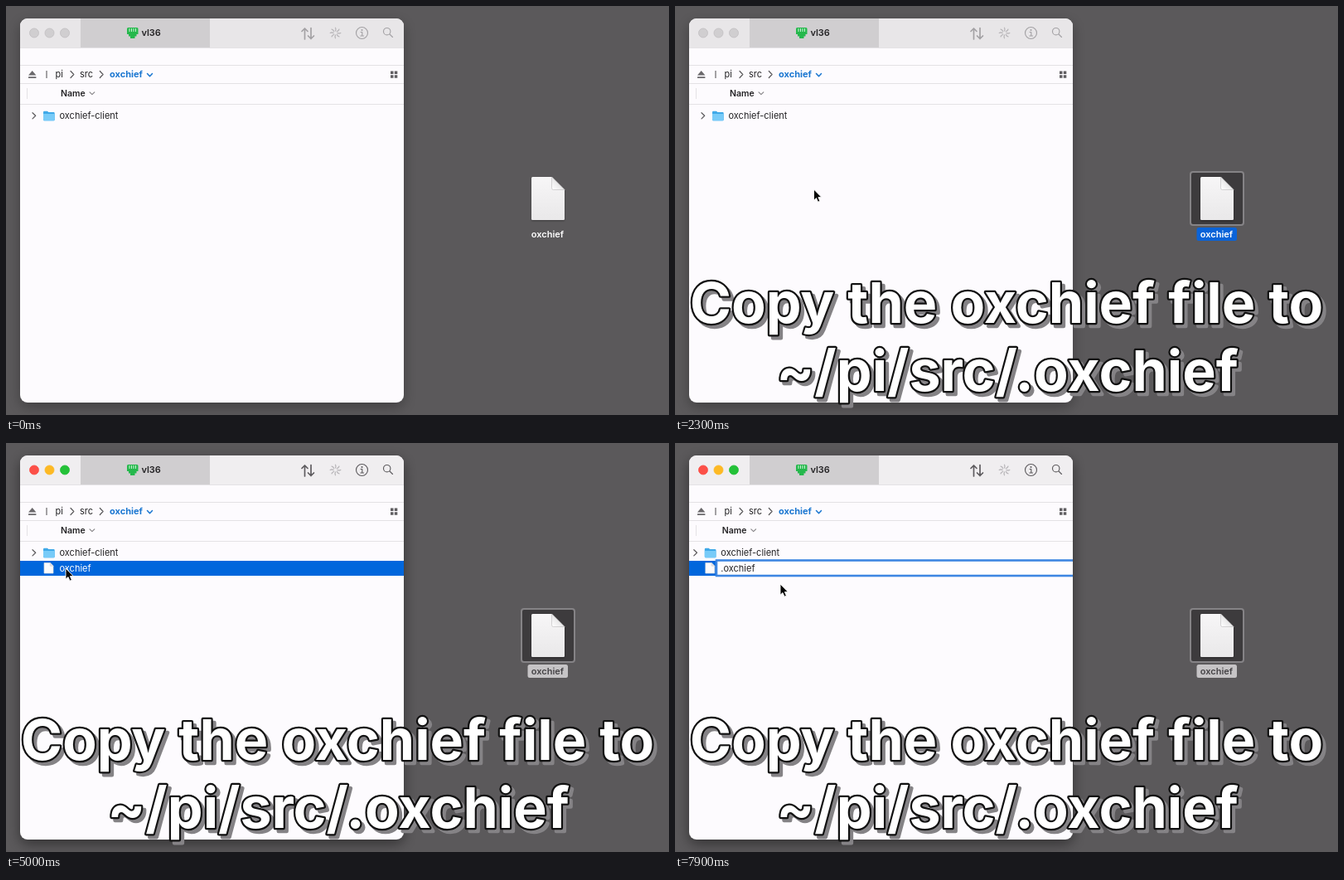
Animation of 800x493 px, one loop 8000 ms. Source, as an HTML page:

```html
<!DOCTYPE html>
<html lang="en">
<head>
<meta charset="utf-8">
<title>Copying a file</title>
<style>
  html, body { margin: 0; width: 100%; height: 100%; overflow: hidden; background: #5b595b; }
  svg { display: block; width: 100%; height: 100%; }
  text { font-family: Inter, Roboto, sans-serif; font-size: 11px; fill: #232224; white-space: pre; }
  .semi { font-weight: 600; }
  .bold { font-weight: 700; }
  .mid { text-anchor: middle; }
  .rule { stroke: #e4e2e5; fill: none; }
  .line { fill: none; stroke-linecap: round; stroke-linejoin: round; }
  #words text {
    font-size: 68px; font-weight: 700; font-optical-sizing: none; text-anchor: middle;
    fill: inherit; stroke: inherit; stroke-width: 4.4px; stroke-linejoin: round; paint-order: stroke;
  }
  .face { fill: #fff; stroke: #111; }
  .shade { fill: #858386; stroke: #858386; }
</style>
</head>
<body>
<svg viewBox="0 0 800 493" preserveAspectRatio="none">
  <defs>
    <linearGradient id="paper" x1="0" y1="0" x2="0" y2="1">
      <stop offset="0" stop-color="#f7f6f7"/><stop offset="1" stop-color="#e9e8e9"/>
    </linearGradient>
    <linearGradient id="fold" x1="0" y1="1" x2="1" y2="0">
      <stop offset="0" stop-color="#fff"/><stop offset="1" stop-color="#d2d1d3"/>
    </linearGradient>
    <filter id="soft" x="-20%" y="-20%" width="140%" height="140%">
      <feDropShadow id="shadow" dx="0" dy="5" stdDeviation="8" flood-color="#000"/>
    </filter>
    <filter id="thin" x="-30%" y="-30%" width="160%" height="160%">
      <feDropShadow dx="0" dy="1" stdDeviation="1" flood-color="#000" flood-opacity=".35"/>
    </filter>
    <clipPath id="frame"><rect x="17" y="15" width="463" height="463" rx="9"/></clipPath>
    <g id="doc">
      <path d="M-18.500-26H4.500L20-10.500V24.500Q20 26 18.500 26H-18.500Q-20 26-20 24.500V-24.500Q-20-26-18.500-26Z" fill="url(#paper)"/>
      <path d="M4.500-26 20-10.500H6.500Q4.500-10.500 4.500-12.500Z" fill="url(#fold)" stroke="#c4c3c5" stroke-width=".7"/>
    </g>
    <g id="words">
      <text x="400" y="382">Copy the oxchief file to</text>
      <text x="401" y="464">~/pi/src/.oxchief</text>
    </g>
  </defs>

  <rect width="800" height="493" fill="#5b595b"/>

  <!-- desktop file -->
  <g id="picked">
    <rect x="622" y="200" width="64" height="64" rx="3" fill="#3d3b3d" stroke="#858386" stroke-width="2"/>
    <rect id="tag" x="629.500" y="267" width="48.500" height="16" rx="2.500"/>
  </g>
  <use href="#doc" x="654" y="232" filter="url(#thin)"/>
  <text id="label" class="semi mid" x="653.500" y="278.500">oxchief</text>

  <!-- file window -->
  <rect x="17" y="15" width="463" height="463" rx="9" fill="#fdfbfe" filter="url(#soft)"/>
  <g clip-path="url(#frame)">
    <rect id="bar" x="17" y="15" width="463" height="35.500"/>
    <rect x="90" y="15" width="156" height="35.500" fill="#d0ced0"/>
    <path class="rule" d="M17 50.500H480M17 71.500H480M17 93.500H480M17 118.500H480M25.500 99V112"/>
    <g id="lights" stroke-width=".8">
      <circle cx="34" cy="32.500" r="5.500"/><circle cx="52.500" cy="32.500" r="5.500"/><circle cx="71" cy="32.500" r="5.500"/>
    </g>
    <g transform="translate(146 26)">
      <path d="M1.500 0H12Q13.500 0 13.500 1.500V8H11.500V10.500H9.500V13H4V10.500H2V8H0V1.500Q0 0 1.500 0Z" fill="#25b84c"/>
      <path d="M3 1V5M5.500 1V5M8 1V5M10.500 1V5" stroke="#c9f3d3"/>
    </g>
    <text class="semi" x="163.500" y="36">vl36</text>

    <g id="tools" class="line" stroke-width="1.700">
      <path d="M360.500 40V27M357 30.500 360.500 27 364 30.500M368 26.500V39.500M364.500 36 368 39.500 371.500 36"/>
      <g stroke-width="1.150">
        <circle cx="429.500" cy="32.500" r="7"/>
        <path d="M428 31.500H429.800V36M427.800 36H431.600"/><circle cx="429.500" cy="29" r=".5"/>
        <circle cx="459.700" cy="30.700" r="4.200"/><path d="M463 34 466.500 37.500"/>
      </g>
    </g>
    <g id="petals" class="line" stroke="#b9b7ba" stroke-width="1.300"></g>

    <path d="M27 83.500 31.700 78 36.400 83.500ZM27 85.200H36.400V87H27Z" fill="#6b696c"/>
    <path d="M49 78V87" stroke="#4a484b"/>
    <text x="59.500" y="86">pi</text>
    <text x="89" y="86">src</text>
    <text class="bold" x="125" y="86" style="fill:#1b77d1">oxchief</text>
    <g class="line" stroke="#5c5a5d" stroke-width="1.200">
      <path d="M78 78.500 81.800 82.500 78 86.500M113.300 78.500 117.100 82.500 113.300 86.500"/>
      <path d="M170.500 81.500 173.500 84.700 176.500 81.500" stroke="#1b77d1" stroke-width="1.500"/>
    </g>
    <path d="M464 78.500h3.500v3.500h-3.500zM468.800 78.500h3.500v3.500h-3.500zM464 83.200h3.500v3.500h-3.500zM468.800 83.200h3.500v3.500h-3.500z" fill="#5f5d60"/>

    <rect id="row" x="17" y="142" width="463" height="18" fill="#0066dc"/>
    <g id="field">
      <rect x="50" y="141.500" width="440" height="18.500" fill="#fefdff" stroke="#3d86e2" stroke-width="2.600"/>
      <rect id="marked" x="55" y="144" width="37.500" height="13.500" fill="#b3d5fb"/>
    </g>
    <rect id="track" x="17" y="470" width="463" height="8" fill="#efedf0"/>

    <g id="list">
      <text class="semi" x="66" y="109.300" style="font-size:10.500px">Name</text>
      <path class="line" d="M101 103.800 103.900 106.700 106.800 103.800" stroke="#858386" stroke-width="1.100"/>
      <path class="line" d="M32 128.700 35.700 132.300 32 135.900" stroke="#5c5a5d" stroke-width="1.200"/>
      <path d="M45 128Q45 126.700 46.200 126.700H50L51.300 128H57.500Q58.700 128 58.700 129.200V137Q58.700 138.200 57.500 138.200H46.200Q45 138.200 45 137Z" fill="#3fa9e8"/>
      <path d="M45 130H58.700V137Q58.700 138.200 57.500 138.200H46.200Q45 138.200 45 137Z" fill="#78cbf8"/>
      <text x="64.500" y="136">oxchief-client</text>
      <g id="entry">
        <path d="M46 144.500H53.300L57 148.200V157H46Z" fill="#fbfafc" stroke="#dddbde" stroke-width=".7"/>
        <path d="M53.300 144.500V148.200H57" fill="#e6e4e7" stroke="#cfcdd0" stroke-width=".6"/>
        <text id="name" x="64.500" y="154.500"></text>
      </g>
    </g>
    <path id="drop" d="M18 120H479V469Q479 477 471 477H26Q18 477 18 469Z" fill="none" stroke="#85bff2" stroke-width="2"/>
  </g>

  <g id="caption">
    <use class="shade" href="#words" x="4" y="4"/>
    <use class="face" href="#words"/>
  </g>

  <!-- pointer -->
  <g id="pointer">
    <g id="ghost">
      <use href="#doc" opacity=".55" filter="url(#thin)"/>
      <rect x="-23.500" y="36" width="46.500" height="15" rx="2.500" fill="#5d98e2"/>
      <text class="semi mid" y="47.500" style="fill:#fff">oxchief</text>
    </g>
    <circle id="ring" fill="none" stroke="#111" stroke-width="1.400"/>
    <path id="arrow" d="M0 0V13.200L3 10.500 5 15.200 7.400 14.200 5.400 9.600H9.400Z" fill="#050505" stroke="#fff" stroke-width=".9" stroke-linejoin="round"/>
    <path id="beam" d="M-3-7Q0-7 0-5Q0-7 3-7M0-5V6M-3 7.500Q0 7.500 0 5.500Q0 7.500 3 7.500" fill="none" stroke="#151515" stroke-width="1.200"/>
    <g id="plus" transform="translate(9 20)">
      <circle r="8.700" fill="#22a843" stroke="#e9f5ec" stroke-width=".8"/>
      <path d="M-5 0H5M0-5V5" stroke="#fff" stroke-width="2"/>
    </g>
  </g>
</svg>
<script>
const LOOP = 8000, STEP = 100;
const $ = id => document.getElementById(id);

// time, x, y of the pointer tip
const PATH = [
  [100, 596, 450], [500, 653.5, 232], [800, 653.5, 232], [1500, 199, 231], [1600, 195.5, 232],
  [1800, 195.5, 232], [2100, 167.5, 221], [2800, 167.5, 221], [3500, 72, 151],
  [5300, 72, 151], [5700, 57.5, 154], [7700, 57.5, 154], [7800, 122, 168], [7900, 127, 170]
];
// time, radius of the press ring
const RING = [[500, 0], [800, 35.5], [1800, 35.5], [2000, 0], [4000, 0], [4200, 20], [4400, 0]];
const AT = {
  enter: 100, press: 600, drag: 800, over: 1100, caption: 1700, release: 1900,
  active: 2900, select: 4300, edit: 5400, trackOff: 6300, caret: 6600, dot: 6900, back: 7800
};

const ease = p => p * p * (3 - 2 * p);
function sample(keys, t) {
  if (t <= keys[0][0]) return keys[0].slice(1);
  for (let i = 1; i < keys.length; i++) {
    const a = keys[i - 1], b = keys[i];
    if (t <= b[0]) {
      const p = ease((t - a[0]) / (b[0] - a[0]));
      return a.slice(1).map((v, k) => v + (b[k + 1] - v) * p);
    }
  }
  return keys[keys.length - 1].slice(1);
}
const show = (id, on) => { $(id).style.display = on ? "" : "none"; };

for (let i = 0; i < 8; i++) {
  const p = document.createElementNS("http://www.w3.org/2000/svg", "path");
  p.setAttribute("d", "M0-2.500Q1-4.500 0-6.300");
  p.setAttribute("transform", `translate(397.500 32.500) rotate(${i * 45})`);
  $("petals").append(p);
}

function render(t) {
  const between = (a, b) => t >= a && t < b;
  const picked = t >= AT.press, active = t >= AT.active;
  const editing = t >= AT.edit, dragging = between(AT.drag, AT.release);

  show("picked", picked);
  $("tag").style.fill = active ? "#c6c4c6" : "#0a63d8";
  $("label").style.fill = active ? "#454346" : "#fff";

  $("shadow").setAttribute("flood-opacity", active ? 0.45 : 0.3);
  $("bar").style.fill = active ? "#f0eef0" : "#e8e6e8";
  $("tools").style.stroke = active ? "#5e5c5f" : "#a4a2a5";
  ["#fc5048", "#fdb924", "#24c138"].forEach((c, i) => {
    const s = $("lights").children[i].style;
    s.fill = active ? c : "#d0ced0";
    s.stroke = active ? c : "#c0bec1";
  });

  show("row", t >= AT.select);
  show("field", editing);
  show("marked", between(AT.edit, AT.caret));
  show("track", between(AT.edit, AT.trackOff));
  show("entry", active);
  $("list").setAttribute("transform", editing ? "translate(-9.200 0)" : "");
  $("name").textContent = t >= AT.dot ? ".oxchief" : "oxchief";
  $("name").style.fill = between(AT.select, AT.edit) ? "#fff" : "#232224";

  show("drop", between(AT.over, AT.release));
  show("caption", t >= AT.caption);

  const [x, y] = sample(PATH, t), [r] = sample(RING, t);
  show("pointer", t >= AT.enter && !between(AT.caret, AT.back));
  $("pointer").setAttribute("transform", `translate(${x} ${y})`);
  show("ghost", dragging);
  show("plus", between(AT.over, AT.release));
  show("arrow", !between(AT.edit, AT.back));
  show("beam", between(AT.edit, AT.back));
  show("ring", r > 2);
  $("ring").setAttribute("r", r);
}

const start = performance.now();
function tick() {
  const t = (performance.now() - start) % LOOP;
  render(Math.floor(t / STEP) * STEP);
  requestAnimationFrame(tick);
}
render(0);
requestAnimationFrame(tick);
</script>
</body>
</html>
```
